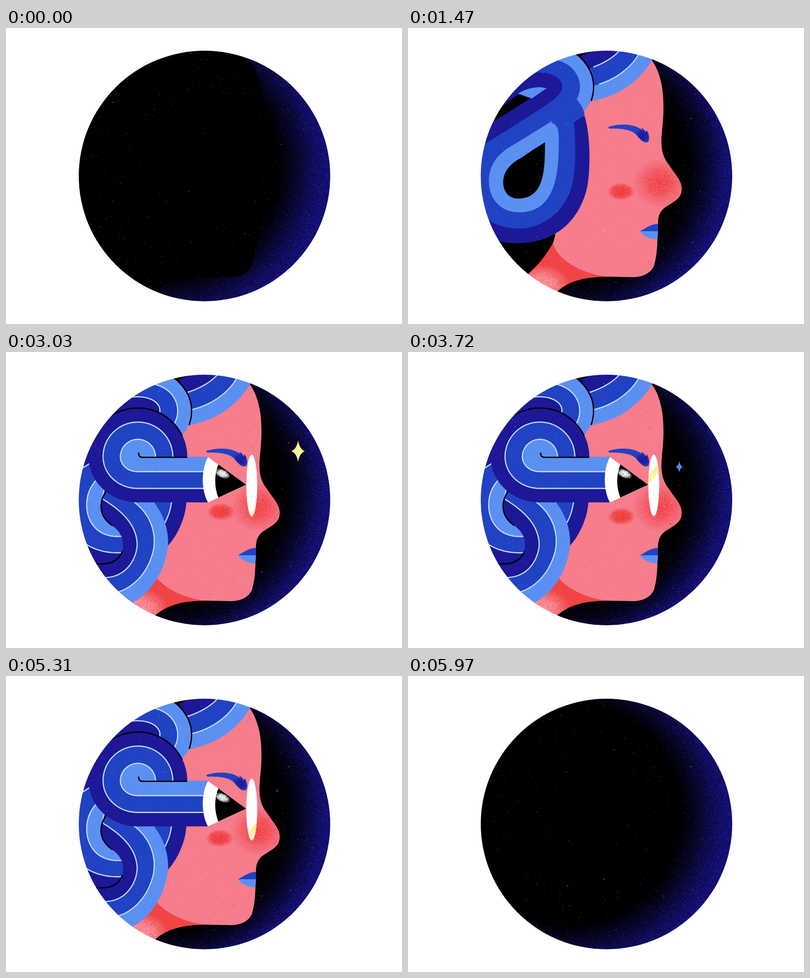
Write an HTML page with a canvas that moves like this. It is 800 by 600 pixels and loops after 6 s.

```html
<!DOCTYPE html>
<html lang="en">
<head>
<meta charset="utf-8">
<title>Night portrait</title>
<style>
html, body { margin: 0; width: 100%; height: 100%; overflow: hidden; background: #fff; }
canvas { display: block; }
</style>
</head>
<body>
<canvas id="stage" width="800" height="600"></canvas>
<script>
const TAU = Math.PI * 2;
const LIGHT = '#5b90f3', MID = '#2142c3', DARK = '#1c1897', LINE = '#bfdafc';
const SKIN = '#f67d8c', RED = '#f14445';
const clamp = x => Math.max(0, Math.min(1, x));
const ramp = (t, a, b) => { const x = clamp((t - a) / (b - a)); return x * x * (3 - 2 * x); };

let seed = 7;
function rand() {
  seed = (seed * 1664525 + 1013904223) >>> 0;
  return seed / 4294967296;
}

function layer(w = 800, h = 600) {
  const c = document.createElement('canvas');
  c.width = w; c.height = h;
  return c.getContext('2d');
}

// Grainy texture: density(x, y) gives the mean opacity of each pixel
function grain(w, h, rgb, density) {
  const g = layer(w, h), img = g.createImageData(w, h);
  for (let i = 0; i < w * h; i++) {
    const p = density(i % w, Math.floor(i / w));
    img.data.set([...rgb, 255 * clamp(p * (0.3 + 1.35 * rand()))], i * 4);
  }
  g.putImageData(img, 0, 0);
  return g.canvas;
}
const puff = (rx, ry, rgb, strength) => grain(rx * 2, ry * 2, rgb, (x, y) =>
  strength * clamp(1 - Math.hypot(x / rx - 1, y / ry - 1)));
const glow = power => grain(800, 600, [23, 19, 138], (x, y) =>
  Math.hypot(x - 401, y - 300) > 256 ? 0 :
  Math.pow(clamp((Math.hypot(x - 325, y - 278) - 222) / 100), power));

function specks() {
  const g = layer(), colors = ['#dfe8ff', '#7f9cf0', '#3b52d8', '#2a35b0', '#d83a3c', '#a8323c'];
  for (let i = 0; i < 2000; i++) {
    const a = rand() * TAU, r = 254 * Math.pow(rand(), 0.38);
    const size = rand() < 0.03 ? 1.7 : 0.5 + rand() * 0.6;
    g.globalAlpha = 0.2 + rand() * 0.5;
    g.fillStyle = colors[Math.floor(rand() * colors.length)];
    g.fillRect(401 + r * Math.cos(a), 300 + r * Math.sin(a), size * (0.8 + rand()), size);
  }
  return g.canvas;
}

const glowBright = glow(1.25), glowDim = glow(1.9);
const dust = [specks(), specks()];
const bigBlush = puff(56, 50, [241, 60, 66], 1.05);
const smallBlush = puff(28, 18, [241, 60, 62], 2.1);
const neckShade = puff(62, 45, [248, 150, 160], 1.5);
const browShade = puff(18, 15, [28, 24, 151], 1.5);
const glint = puff(17, 9, [255, 255, 255], 2);

// Curves are sampled once so bands can grow along them
const STEPS = 90;
function curve(d) {
  const p = document.createElementNS('http://www.w3.org/2000/svg', 'path');
  p.setAttribute('d', d);
  const len = p.getTotalLength();
  return Array.from({ length: STEPS + 1 }, (_, i) => {
    const q = p.getPointAtLength(len * i / STEPS);
    return [q.x, q.y];
  });
}
const forehead = [
  'M500 50L494 63C468 108 425 138 370 148',
  'M475 35L466 53C450 82 415 108 374 117',
  'M440 30L427 46C415 60 392 74 366 82',
  'M395 40L380 46C372 47 360 50 350 57'].map(curve);
const arch = [
  'M300 20L340 53C375 85 388 130 358 165C335 195 300 217 255 245',
  'M270 50L302 66C348 78 358 125 335 152C315 176 280 194 240 220',
  'M225 92L258 91C305 88 320 115 306 132C294 150 260 167 223 192',
  'M170 175L190 160C225 128 255 115 280 121L208 168'].map(curve);
const loop = [
  'M255 245L230 262C215 270 192 285 192 313C192 333 205 346 222 346C275 346 277 290 277 233',
  'M240 220L210 238C190 250 163 270 163 310C163 345 185 374 225 374C300 374 305 290 305 230C305 215 305 195 290 192',
  'M223 192L155 235C125 255 118 300 125 335C135 385 180 407 225 407C260 407 310 385 330 325C340 290 340 230 335 190',
  'M208 168L130 215C90 240 90 300 100 340C120 410 170 436 215 436C290 437 340 400 360 330C368 300 370 220 356 177'].map(curve);
const curl = [
  'M285 290L301 308C325 340 331 380 325 405C317 450 290 490 256 507L235 525',
  'M235 270L252 299C298 330 304 375 297 405C286 447 260 475 228 486L205 500',
  'M198 280L195 298C240 325 265 355 265 392C262 425 240 455 203 457L180 465',
  'M200 283C185 310 190 335 215 352C238 368 239 390 235 404C228 425 205 432 183 429L160 431'].map(curve);
// The roll turns three quarters, then runs straight to the eye
const TURN = 0.68;
const roll = [[0, 0], [35.5, 30], [70.5, 64], [99.5, 92]].map(([r, end]) =>
  Array.from({ length: STEPS + 1 }, (_, i) => {
    const u = i / STEPS, a = Math.min(1, u / TURN);
    const rr = r + (end - r) * ramp(a, 0.66, 1);
    return [266.5 + rr * Math.cos(1.5 * Math.PI * a) + 141.5 * Math.max(0, (u - TURN) / (1 - TURN)),
      212.5 - rr * Math.sin(1.5 * Math.PI * a)];
  }));

const main = document.getElementById('stage').getContext('2d');
const head = layer();
let g = head;

function trim(pts, u) {
  const n = u * STEPS, k = Math.floor(n), out = pts.slice(0, k + 1);
  if (k < STEPS) {
    const [a, b] = [pts[k], pts[k + 1]], f = n - k;
    out.push([a[0] + (b[0] - a[0]) * f, a[1] + (b[1] - a[1]) * f]);
  }
  return out;
}
function trace(pts) {
  g.beginPath();
  pts.forEach(p => g.lineTo(p[0], p[1]));
}
function band(edges, u, v) {
  if (u <= 0) return;
  [LIGHT, MID, DARK].forEach((color, i) => {
    trace([...trim(edges[i], u), ...trim(edges[i + 1], u).reverse()]);
    g.closePath();
    g.fillStyle = g.strokeStyle = color;
    g.lineWidth = 0.6;
    g.fill(); g.stroke();
  });
  if (v <= 0) return;
  g.strokeStyle = LINE;
  g.lineWidth = 2.4;
  [1, 2].forEach(i => { trace(trim(edges[i], Math.min(u, v))); g.stroke(); });
}

const shapes = {};
const shape = d => shapes[d] || (shapes[d] = new Path2D(d));
const fill = (d, color) => { g.fillStyle = color; g.fill(shape(d)); };
function ink(d, alpha) {
  g.globalAlpha = alpha;
  g.strokeStyle = '#000';
  g.lineWidth = 2.6;
  g.stroke(shape(d));
  g.globalAlpha = 1;
}
function within(d, draw) {
  g.save(); g.clip(shape(d)); draw(); g.restore();
}

const FACE = 'M490 62C512 90 516 130 516 155C517 185 512 210 512 230C512 255 520 268 526 276C540 297 553 310 553 325C553 345 540 350 525 360C510 368 505 380 505 395L504 428C503 460 500 470 497 482C490 497 475 505 453 505L400 504C350 497 300 470 293 435L250 300L300 100L490 50Z';
const NECK = 'M293 430C280 462 255 488 243 498L225 520L290 545L301 534C330 510 360 505 405 504L410 470Z';
const HAIR = 'M490 62C470 100 425 130 371 142L338 190C345 230 341 245 332 265C325 283 318 307 308 322C290 350 294 365 295 382C299 415 299 420 293 435C280 462 255 488 243 498L100 530L100 30L490 30Z';
const BROW = 'M406 200C430 193 458 194 473 207L471 202C476 204 479 208 480 212L482 207C487 214 489 225 485 231C475 235 468 224 460 215C450 206 430 203 408 204C405 204 404 201 406 200Z';
const IRIS = 'M429 228C420 250 421 275 429 295L485 269Z';

function drawFace(t) {
  fill(NECK, RED);
  within(NECK, () => g.drawImage(neckShade, 205, 478));
  fill(FACE, SKIN);
  within(FACE, () => g.drawImage(bigBlush, 453, 264));
  const p = t / 2000;
  g.drawImage(smallBlush, 405.5 + 3.6 * Math.cos(TAU * (p - 0.27)), 309 - 6 * Math.cos(TAU * (p - 0.37)));
  fill('M469 412C485 402 495 397 505 397L505 412Z', MID);
  fill('M469 412L505 412L504 428C490 429 475 422 469 412Z', LIGHT);
  fill(BROW, MID);
  within(BROW, () => g.drawImage(browShade, 456, 203));
  fill(HAIR, '#000');
}

function drawHair(t) {
  band(forehead, ramp(t, 680, 1350), ramp(t, 700, 1650));
  band(arch, ramp(t, 250, 660), ramp(t, 1480, 1950));
  ink('M340 53C372 78 382 112 370 148', ramp(t, 1150, 1400));
  band(loop, ramp(t, 660, 1400), ramp(t, 1480, 2050));
  if (t > 1380 && t < 2600) {
    fill('M318 127C340 140 352 155 357 175L335 192L305 215C305 200 303 192 290 191L300 150Z', MID);
    fill('M222 133C240 122 262 117 280 122L250 143Z', LIGHT);
  }
  band(curl, ramp(t, 1500, 2200), ramp(t, 1600, 2350));
  const late = ramp(t, 2150, 2400);
  ink('M202 282C185 310 190 335 215 352', late);
  ink('M183 429C205 432 228 425 235 404', late);

  const u = ramp(t, 1550, 2450);
  band(roll, u, ramp(t, 1600, 2550));
  ink('M215 128A99 99 0 0 1 356 170', late);
  ink('M268 204C268 211 270 213.5 277 213.5L366 213.5', late);
  if (u > 0.05) drawEye(u);
}

function drawEye(u) {
  g.save();
  g.translate(266.5, 212.5);
  g.rotate(1.5 * Math.PI * (1 - Math.min(1, u / TURN)));
  g.translate(-266.5 - 141.5 * (1 - Math.max(0, (u - TURN) / (1 - TURN))), -212.5);
  fill('M408 213C394 238 394 280 408 305L485 269Z', '#fff');
  fill(IRIS, '#000');
  within(IRIS, () => {
    g.translate(437, 246);
    g.rotate(0.42);
    g.drawImage(glint, -17, -9);
  });
  g.restore();
}

function drawLens(t) {
  const s = ramp(t, 2300, 2600);
  if (!s) return;
  g.save();
  g.beginPath();
  g.ellipse(496.5, 270.5, 11 * s, 62.5 * s, 0, 0, TAU);
  g.fillStyle = '#fff';
  g.fill();
  g.clip();
  // Yellow reflection sweeps up the glass
  const q = (t / 2000) % 1 - 0.46;
  if (q > 0 && q < 0.54) {
    g.globalAlpha = clamp(q * 9);
    g.translate(484, 333 - q * 90 - Math.max(0, q - 0.2) * 260);
    fill('M0 9L26 -25L26 -6L0 24Z', '#fff2a0');
  }
  g.restore();
}

function star(t, x, y, rx, ry, color, start, span) {
  const q = ((t / 2000 - start) % 1 + 1) % 1 / span;
  if (t < 2450 || q >= 1) return;
  const s = Math.min(1, 1.15 * Math.sin(Math.PI * q));
  g.save();
  g.globalAlpha = clamp(s * 1.3 - 0.1) * (1 - ramp(t, 5500, 5800));
  g.translate(x, y);
  g.scale(rx * s, ry * s);
  g.fillStyle = color;
  g.beginPath();
  g.moveTo(0, -1);
  [[1, 0], [0, 1], [-1, 0], [0, -1]].reduce((a, b) => {
    g.quadraticCurveTo((a[0] + b[0]) * 0.2, (a[1] + b[1]) * 0.2, b[0], b[1]);
    return b;
  }, [0, -1]);
  g.fill();
  g.restore();
}

function render(now) {
  const t = now % 6000;
  const dark = Math.max(1 - ramp(t, 0, 350), ramp(t, 5500, 5820));

  g = head;
  g.clearRect(0, 0, 800, 600);
  drawFace(t);
  drawHair(t);
  drawLens(t);
  g.globalCompositeOperation = 'source-atop';
  g.globalAlpha = dark;
  g.fillStyle = '#000';
  g.fillRect(0, 0, 800, 600);
  g.globalCompositeOperation = 'source-over';
  g.globalAlpha = 1;

  g = main;
  g.fillStyle = '#000';
  g.fillRect(0, 0, 800, 600);
  g.globalAlpha = 1 - dark;
  g.drawImage(glowDim, 0, 0);
  g.globalAlpha = dark;
  g.drawImage(glowBright, 0, 0);
  g.globalAlpha = 1;
  star(t, 590, 201, 13.5, 22, '#fff39a', 0.35, 0.3);
  star(t, 548, 233, 7, 12, '#5b83e8', 0.56, 0.85);
  star(t, 614, 277, 10.5, 17, SKIN, 0.03, 0.36);
  g.globalAlpha = 1 - ramp(t, 5800, 5950);
  g.drawImage(head.canvas, 0, 0);
  g.globalAlpha = 0.75;
  g.drawImage(dust[Math.floor(t / 30) % 2], 0, 0);
  g.globalAlpha = 1;

  // White surround, laid once so the rim stays clean
  g.fillStyle = '#fff';
  g.beginPath();
  g.rect(0, 0, 800, 600);
  g.arc(401, 300, 254, 0, TAU);
  g.fill('evenodd');
  requestAnimationFrame(() => render(performance.now() - begin));
}
const begin = performance.now();
render(0);
</script>
</body>
</html>
```
